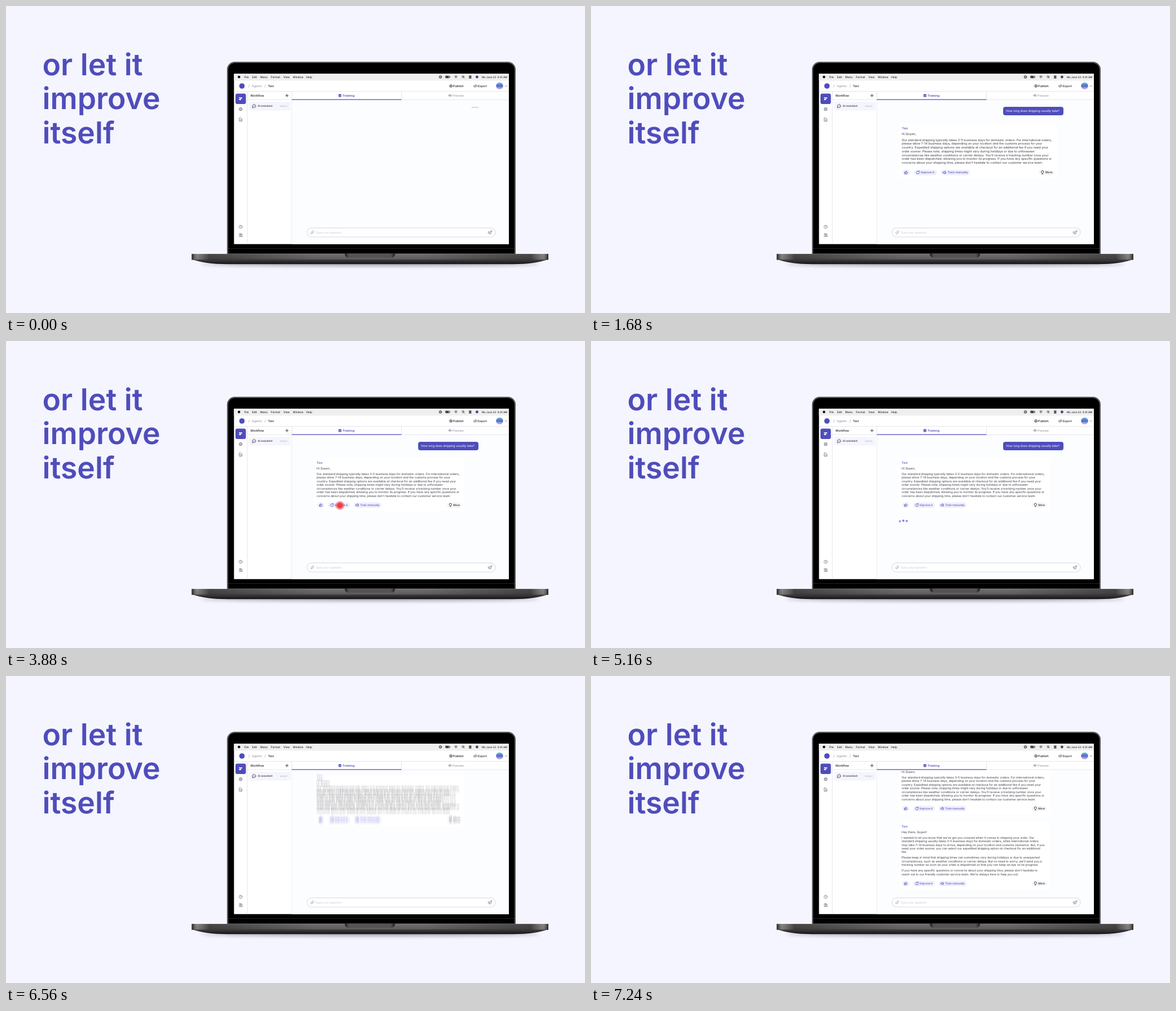
Write an HTML page that moves like this. It is 1027x545 px and loops after 8000 ms.

```html
<!DOCTYPE html>
<html lang="en">
<head>
<meta charset="utf-8">
<title>Let it improve itself</title>
<style>
  html, body { margin: 0; width: 100%; height: 100%; overflow: hidden; background: #f5f5ff; }
  svg { display: block; width: 1027px; height: 545px; font: 5.3px Inter, sans-serif; font-feature-settings: "cv11"; text-rendering: geometricPrecision; }
  text { white-space: pre; }
  .line { fill: none; stroke-width: .8; stroke-linecap: round; stroke-linejoin: round; }
  .medium { font-weight: 500; }
  .bold { font-weight: 600; }
</style>
</head>
<body>
<svg viewBox="0 0 1027 545">
  <defs>
    <linearGradient id="metal" x2="0" y2="1">
      <stop offset="0" stop-color="#8f8b8c"/><stop offset=".12" stop-color="#6f6b6c"/>
      <stop offset=".85" stop-color="#615d5e"/><stop offset="1" stop-color="#4a4647"/>
    </linearGradient>
    <linearGradient id="lip" x2="0" y2="1">
      <stop offset="0" stop-color="#454142"/><stop offset="1" stop-color="#151314"/>
    </linearGradient>
    <linearGradient id="ends">
      <stop offset="0" stop-color="#000" stop-opacity=".7"/><stop offset=".015" stop-color="#bbb" stop-opacity=".3"/>
      <stop offset=".05" stop-color="#000" stop-opacity=".35"/><stop offset=".35" stop-color="#000" stop-opacity="0"/>
      <stop offset=".65" stop-color="#000" stop-opacity="0"/><stop offset=".95" stop-color="#000" stop-opacity=".35"/>
      <stop offset=".985" stop-color="#bbb" stop-opacity=".3"/><stop offset="1" stop-color="#000" stop-opacity=".7"/>
    </linearGradient>
    <linearGradient id="notch">
      <stop offset="0" stop-color="#1c1a1b"/><stop offset=".08" stop-color="#575354"/>
      <stop offset=".92" stop-color="#575354"/><stop offset="1" stop-color="#1c1a1b"/>
    </linearGradient>
    <linearGradient id="avatar" x2="0" y2="1">
      <stop offset="0" stop-color="#62c7d8"/><stop offset=".5" stop-color="#5b62c9"/><stop offset="1" stop-color="#d5cdf3"/>
    </linearGradient>
    <filter id="soft" x="-10%" y="-200%" width="120%" height="500%"><feGaussianBlur stdDeviation="3"/></filter>
    <clipPath id="panel"><rect x="507.5" y="166.8" width="384.5" height="255.9"/></clipPath>
  </defs>

  <g font-size="53.5" class="bold" fill="#4f4dbb">
    <text x="64.5" y="122.5">or let it</text>
    <text x="64.5" y="183.2">improve</text>
    <text x="64.5" y="243.8">itself</text>
  </g>

  <!-- laptop -->
  <ellipse cx="646" cy="458" rx="300" ry="3.5" fill="#334" opacity=".45" filter="url(#soft)"/>
  <path d="M392 440V113a14 14 0 0 1 14-14H890a14 14 0 0 1 14 14V440Z" fill="#4a4b4e"/>
  <path d="M393.500 440V113a12.500 12.500 0 0 1 12.500-12.500H890a12.500 12.500 0 0 1 12.500 12.500V440Z" fill="#000" stroke="#808185" stroke-width=".8"/>
  <path d="M394 430.500H902" stroke="#222"/>
  <path d="M329.500 449.500H962Q940 458 900 458.300H392Q352 458 329.500 449.500Z" fill="url(#lip)"/>
  <rect x="329.500" y="440" width="632.500" height="10.500" fill="url(#metal)"/>
  <rect x="329.500" y="440" width="632.500" height="10.500" fill="url(#ends)"/>
  <path d="M601 439.500H690V441Q689 447 682 447H609Q602 447 601 441Z" fill="url(#notch)"/>

  <!-- screen -->
  <rect x="404.400" y="120.300" width="487.600" height="302.400" fill="#fff"/>
  <rect x="404.400" y="120.300" width="487.600" height="12.200" fill="#efeff0"/>
  <g id="menu" font-size="4.8" class="medium" fill="#222">
    <circle cx="413.300" cy="126" r="2.300" fill="#111"/>
    <text x="844" y="127.700" font-size="4.500">Mo June 22  9:41 AM</text>
    <g class="line" stroke="#222" stroke-width=".6">
      <circle cx="770.500" cy="126" r="2.300"/><path d="M769.500 125h2M769.500 127h2"/>
      <rect x="779.500" y="124.200" width="7" height="3.600" rx="1"/><path d="M787.600 125.500v1"/>
      <path d="M795.700 125q2.300-2 4.600 0M796.600 126.300q1.400-1.200 2.800 0"/>
      <circle cx="810.600" cy="125.600" r="1.600"/><path d="M811.800 126.800l1.200 1.200"/>
    </g>
    <rect x="780.200" y="124.900" width="5" height="2.200" rx=".4"/>
    <circle cx="798" cy="127.600" r=".6"/>
    <rect x="821" y="123.700" width="4.600" height="2" rx="1"/><rect x="821" y="126.400" width="4.600" height="2" rx="1"/>
    <circle cx="835.400" cy="126" r="2.400" fill="#3b4a6b"/>
  </g>

  <!-- header -->
  <circle cx="418.500" cy="142" r="4.800" fill="#4f4dbb"/>
  <g fill="#8d8d9b">
    <text x="436" y="143.900">Agents</text>
    <path class="line" stroke="#b9b9c4" d="M430.300 144.500l1.600-5M459 144.500l1.600-5" stroke-width=".6"/>
  </g>
  <g class="medium" fill="#1b1b22">
    <text x="464.500" y="143.900">Tavi</text>
    <text x="793" y="143.900">Publish</text>
    <text x="837" y="143.900" font-size="5.100">Export</text>
    <g class="line" stroke="#1b1b22">
      <path d="M787.800 144.200a2.500 2.500 0 1 1 2.700 0M789.100 144.500v-3m-1.200 1l1.200-1.200 1.200 1.200"/>
      <path d="M831 140.500l-1.600 1.500 1.600 1.500M834.200 140.500l1.400 1.500-1.400 1.500M831.800 144.200l1.500-4.400"/>
      <path d="M885.500 141.500l1.500 1.400 1.500-1.400" stroke="#777"/>
    </g>
  </g>
  <circle cx="875.500" cy="142" r="6.200" fill="url(#avatar)"/>

  <!-- side bar and workflow -->
  <path d="M404.400 151.500H892M428 151.500V422.700M507 151.500V422.700M428 166.300H507M701.500 151.500V166" fill="none" stroke="#e3e3ec" stroke-width=".9"/>
  <rect x="407" y="155.500" width="18.500" height="18.500" rx="3.200" fill="#4f4dbb"/>
  <path d="M413.300 162h3.300v2.200h2.200v-2.200h.200v2.600h-2.200v2.400h-3.400v-2.200h2v-1.200h-2.100Z" fill="#fff"/>
  <circle cx="418" cy="163" r="1.100" fill="#fff"/>
  <g class="line" stroke="#8c8c98">
    <circle cx="416.200" cy="183.200" r="2.300" stroke-width="1.100"/><circle cx="416.200" cy="183.200" r=".7"/>
    <circle cx="416.200" cy="183.200" r="2.900" stroke-dasharray="1 1.280" stroke-linecap="butt"/>
    <path d="M414 198.700h2.800l1.700 1.700v4.200h-4.500Z" stroke-width="1"/><path d="M415.200 201.400h2M415.200 203h2"/>
    <circle cx="416.200" cy="392" r="3"/><path d="M415.200 391.300a1 1 0 1 1 1.500.8q-.5.300-.5.800M416.200 394v.1"/>
    <path d="M413.800 404.300v5.200h1.700v-5.200ZM415.500 404.300v5.200h1.700v-5.200ZM417.300 404.800l1.200-.3 1.200 4.800-1.200.3Z"/>
  </g>
  <text x="433.500" y="161" class="medium" fill="#1b1b22">Workflow</text>
  <path class="line" stroke="#1b1b22" d="M495.800 159h5M498.300 156.500v5"/>
  <rect x="431" y="170" width="74" height="15.500" rx="3" fill="#f5f5fe"/>
  <g class="line" stroke="#33333d"><path d="M437 180.600l.4-1.500a3 3 0 1 1 1.300 1.200Z"/><path d="M438.700 177.700h.1M440.100 177.700h.1M441.500 177.700h.1"/></g>
  <text x="446.500" y="179.400" font-size="4.700" fill="#33333d" class="medium">AI assistant</text>
  <text x="486" y="179" font-size="3.800" fill="#adadb9">default</text>

  <!-- tabs -->
  <rect x="589.800" y="156.600" width="5" height="5" rx="1" fill="#4f4dbb"/>
  <path class="line" stroke="#fff" d="M591 159.100l1 1 1.700-1.900" stroke-width=".6"/>
  <text x="597" y="161" class="bold" fill="#4f4dbb">Training</text>
  <g class="line" stroke="#8d8d9b"><path d="M784.700 158.800q2.800-3.600 5.600 0q-2.800 3.600-5.600 0Z"/><circle cx="787.500" cy="158.800" r=".8"/></g>
  <text x="792" y="161" fill="#8d8d9b">Preview</text>

  <g clip-path="url(#panel)">
    <g id="feed">
      <rect x="507" y="100" width="385" height="420" fill="#fcfdff"/>
      <g id="bubble">
        <rect x="731" y="179" width="107" height="15" rx="4" fill="#4f4dbb"/>
        <text x="736.300" y="188.400" fill="#fff">How long does shipping usually take?</text>
      </g>
      <g id="answer"></g>
      <g id="typing" fill="#8583d8"></g>
      <g id="improved"></g>
    </g>
    <g id="trail"></g>
  </g>
  <path d="M701.500 166.300H892" stroke="#e3e3ec" stroke-width=".9"/>
  <path d="M507 166.200H701.500" stroke="#4f4dbb" stroke-width="1.300"/>

  <!-- question field -->
  <rect x="534" y="393.800" width="334" height="16.200" rx="8" fill="#fff" stroke="#dedeea" stroke-width="1.200"/>
  <text x="548.500" y="403.900" font-size="5.200" fill="#c9c9d4">Type your question</text>
  <path class="line" stroke="#9c9ca8" d="M545.800 401.500l-2.600 2.600a1.500 1.500 0 0 1-2.200-2.200l2.700-2.700a1 1 0 0 1 1.500 1.500l-2.500 2.500" stroke-width=".6"/>
  <path class="line" stroke="#8c8c98" d="M855 401.300l7-2.500-2.300 6.600-1.700-2.500ZM858 402.900l4-4.100M856.500 402.300v2.700l1.500-1.500"/>

  <g id="click" fill="#f23c41">
    <circle id="halo" cx="592.300" cy="292" opacity=".5"/>
    <circle cx="592.300" cy="292" r="5"/>
  </g>
</svg>
<script>
const $ = id => document.getElementById(id);
const LOOP = 8000, LEFT = 547, ANSWER_TOP = 208, SCROLL = 56, IMPROVED_TOP = 258.7 + SCROLL;
const clamp = (v, lo = 0, hi = 1) => Math.min(hi, Math.max(lo, v));
const progress = (t, from, to) => clamp((t - from) / (to - from));

const answerText = [[
  'Our standard shipping typically takes 3-5 business days for domestic orders. For international orders,',
  'please allow 7-14 business days, depending on your location and the customs process for your',
  'country. Expedited shipping options are available at checkout for an additional fee if you need your',
  'order sooner. Please note, shipping times might vary during holidays or due to unforeseen',
  'circumstances like weather conditions or carrier delays. You\'ll receive a tracking number once your',
  'order has been dispatched, allowing you to monitor its progress. If you have any specific questions or',
  'concerns about your shipping time, please don\'t hesitate to contact our customer service team.'
]];
const improvedText = [[
  'I wanted to let you know that we\'ve got you covered when it comes to shipping your order. Our',
  'standard shipping usually takes 3-5 business days for domestic orders, while international orders',
  'may take 7-14 business days to arrive, depending on your location and customs clearance. But, if you',
  'need your order sooner, you can select our expedited shipping option at checkout for an additional',
  'fee.'
], [
  'Please keep in mind that shipping times can sometimes vary during holidays or due to unexpected',
  'circumstances, such as weather conditions or carrier delays. But no need to worry, we\'ll send you a',
  'tracking number as soon as your order is dispatched so that you can keep an eye on its progress.'
], [
  'If you have any specific questions or concerns about your shipping time, please don\'t hesitate to',
  'reach out to our friendly customer service team. We\'re always here to help you out.'
]];

function pill(x, width, y, icon, label, ink = '#5553c0', fill = '#eeeefe') {
  return `<rect class="pill" x="${x}" y="${y - 4.7}" width="${width}" height="9.4" rx="4.7" fill="${fill}"/>
    <path class="line" stroke="${ink}" stroke-width=".6" transform="translate(${x + 6.3} ${y})" d="${icon}"/>
    <text class="medium" x="${x + 11.2}" y="${y + 1.75}" font-size="4.85" fill="${ink}">${label}</text>`;
}

function card(top, greeting, paragraphs) {
  const row = (y, s, attrs = 'fill="#3a3a44"') => `<text x="551" y="${y}" ${attrs}>${s}</text>`;
  let y = top + 20;
  let body = row(top + 10, 'Tavi', 'class="medium" fill="#4f4dbb"') + row(y, greeting);
  for (const lines of paragraphs) {
    y += 10;
    lines.forEach((s, i) => body += row(y + i * 6.43, s));
    y += (lines.length - 1) * 6.43;
  }
  y += 14.7;
  return `<rect x="${LEFT}" y="${top}" width="266" height="${y + 10 - top}" rx="4" fill="#fff"/><g font-size="5.25">${body}</g>` +
    pill(552, 12.5, y, 'M-2.4-.3v2.500h1.200v-2.500ZM-1.200-.3l1.200-2.300q1.200.3.500 2h1.800l-.5 2.800h-3', '') +
    pill(571.8, 38.4, y, 'M.5-2.200a2.400 2.400 0 1 0 1.900 2M.5-2.200l1.600-.4M2.300-2.500v1.600', 'Improve it') +
    pill(617, 49, y, 'M-2.500-1h1.300l2-1.500v5l-2-1.500h-1.300ZM2-1.200q1 1.200 0 2.400', 'Train manually') +
    pill(782, 26.500, y, 'M-.9 1.200q-1.500-1-1.100-2.300a2 2 0 0 1 4 0q.4 1.300-1.100 2.300ZM-.7 2.500h1.400', 'More', '#22222a', '#f5f5f7');
}

$('menu').insertAdjacentHTML('beforeend',
  [['File', 422.5], ['Edit', 436.5], ['Menu', 451], ['Format', 469.8], ['View', 492], ['Window', 508.7], ['Help', 532.3]]
    .map(([s, x]) => `<text x="${x}" y="127.8">${s}</text>`).join(''));
$('answer').innerHTML = card(ANSWER_TOP, 'Hi Quyen,', answerText);
$('improved').innerHTML = card(IMPROVED_TOP, 'Hey there, Quyen!', improvedText);
$('typing').innerHTML = [548, 554, 560].map(x => `<circle cx="${x}" r="2"/>`).join('');
const TRAIL = 7;
for (let i = 1; i < TRAIL; i++)
  $('trail').innerHTML += `<use href="#feed" opacity="${1 / (i + 1)}"/>`;

const improvePill = $('answer').querySelectorAll('.pill')[1];
const dots = [...$('typing').children], ghosts = [...$('trail').children];

// Grows to the peak scale, then settles back to 1.
function pop(t, start, top, end, peak) {
  return t < top ? peak * progress(t, start, top)
                 : 1 + (peak - 1) * (1 - progress(t, top, end)) ** 3;
}
function scaleFrom(el, x, y, s) {
  el.setAttribute('transform', `translate(${x} ${y}) scale(${s}) translate(${-x} ${-y})`);
  el.style.display = s ? '' : 'none';
}
const scrollAt = t => -SCROLL * (1 - Math.cos(Math.PI * progress(t, 6370, 6690))) / 2;

function draw(t) {
  scaleFrom($('bubble'), 838, 179, pop(t, -20, 200, 600, 1.2));
  $('bubble').style.opacity = progress(t, -20, 60);
  scaleFrom($('answer'), LEFT, ANSWER_TOP, pop(t, 1480, 1680, 2120, 1.052));
  scaleFrom($('improved'), LEFT, IMPROVED_TOP, pop(t, 6560, 6760, 7240, 1.05));

  $('click').style.opacity = t < 3880 ? 0 : 1 - progress(t, 4440, 4520);
  $('halo').setAttribute('r', 7.7 + 2.3 * Math.sin(Math.PI * progress(t, 3880, 4200)));
  const press = progress(t, 3880, 4040) - progress(t, 4440, 4600);
  improvePill.setAttribute('fill', `rgb(${238 - 14 * press},${238 - 14 * press},254)`);

  $('typing').style.opacity = progress(t, 4440, 4600) - progress(t, 6120, 6280);
  dots.forEach((dot, i) => {
    const wave = Math.sin(2 * Math.PI * (t / 800 - i / 6));
    dot.setAttribute('cy', 320.5 - 1.5 * wave);
    dot.setAttribute('opacity', .7 + .3 * wave);
  });

  // Motion blur: average several positions across the shutter time.
  const first = scrollAt(t - 20), moving = scrollAt(t + 20) !== first;
  $('feed').setAttribute('transform', `translate(0 ${first})`);
  $('trail').style.display = moving ? '' : 'none';
  if (moving) ghosts.forEach((ghost, i) =>
    ghost.setAttribute('transform', `translate(0 ${scrollAt(t - 20 + 40 * (i + 1) / (TRAIL - 1)) - first})`));
}

function frame() {
  draw(performance.now() % LOOP);
  requestAnimationFrame(frame);
}
frame();
</script>
</body>
</html>
```
